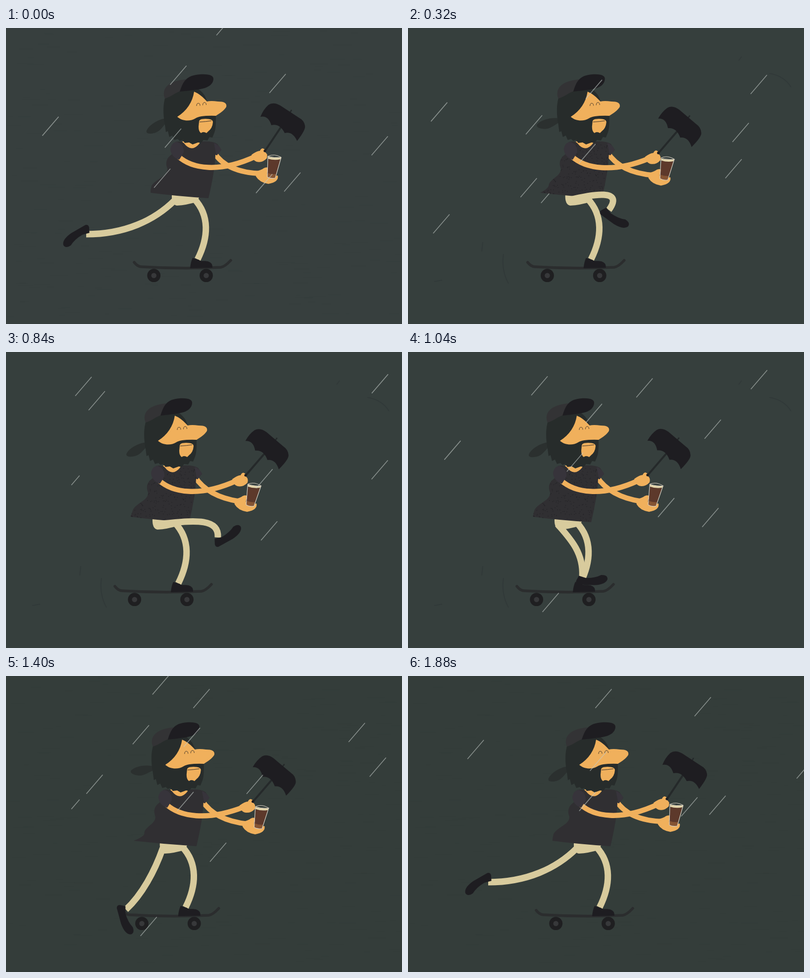
Animation, 800 px wide and 600 px high, one loop 1920 ms. Source, as an HTML page with a canvas:

```html
<!DOCTYPE html>
<html lang="en">
<meta charset="utf-8">
<title>Skating in the rain</title>
<style>
html, body { margin: 0; width: 100%; height: 100%; overflow: hidden; background: #373f3e; }
canvas { display: block; }
</style>
<canvas id="stage" width="800" height="600"></canvas>
<script>
const g = document.getElementById('stage').getContext('2d');
const LOOP = 1920, STEP = 40, STEPS = LOOP / STEP;
const SKIN = '#f0b05c', BLACK = '#1e1d21', HAIR = '#272c2b', SHIRT = '#302f32', PANTS = '#d8cb9d';

// Kicking leg: two curve controls, the ankle and the shoe angle
const back = { at: 0, pose: [300, 390, 240, 418, 162, 418, 150] };
const kicks = [
  back,
  { at: 320, pose: [390, 337, 455, 325, 423, 369, 36] },
  { at: 840, pose: [400, 345, 470, 330, 467, 376, -29] },
  { at: 1200, pose: [341, 400, 339, 460, 337, 511, 24] },
  { at: 1660, pose: back.pose },
  { at: LOOP, pose: back.pose }
];

function ease(t, from, to) {
  const s = Math.min(1, Math.max(0, (t - from) / (to - from)));
  return s * s * (3 - 2 * s);
}

function random(seed) {
  seed *= 7919;
  return () => (seed = seed * 16807 % 2147483647) / 2147483647;
}

// Each drop slides down one of the slanted lanes and ends at its landing step
const drops = (() => {
  const rnd = random(23), lanes = [];
  for (let i = 0; i < 19; i++) lanes.push({ top: 220 + i * 54, end: 190 + rnd() * 380 });
  return Array.from({ length: 76 }, (_, i) => ({ ...lanes[i % 19], land: Math.floor(rnd() * STEPS) }));
})();

function fill(d, color) {
  g.fillStyle = color;
  g.fill(new Path2D(d));
}

function line(d, color, width, cap = 'butt') {
  g.strokeStyle = color;
  g.lineWidth = width;
  g.lineCap = cap;
  g.stroke(new Path2D(d));
}

function disc(x, y, r, color) {
  g.fillStyle = color;
  g.beginPath();
  g.arc(x, y, r, 0, 7);
  g.fill();
}

function turned(x, y, degrees, draw) {
  g.save();
  g.translate(x, y);
  g.rotate(degrees * Math.PI / 180);
  g.translate(-x, -y);
  draw();
  g.restore();
}

function paper(kind) {
  g.fillStyle = ['#373f3e', '#363f3d', '#343d3a'][kind];
  g.fillRect(0, 0, 800, 600);
  if (kind === 1) {
    line('M193,458Q188,490 203,518M730,92Q760,97 774,120M668,66L674,58M53,514L69,511M151,434L149,453', 'rgba(30,38,40,.2)', 2);
    return;
  }
  const rnd = random(kind + 7);
  g.fillStyle = 'rgba(25,35,32,.06)';
  for (let i = 0; i < 260; i++) g.fillRect(rnd() * 800, rnd() * 585, 8 + rnd() * 30, 1);
}

function board() {
  line('M259,475Q266,484 274,484Q355,489 434,485Q442,484 454,471', '#2b2d2e', 5.5, 'round');
  for (const x of [298.7, 404.5]) {
    disc(x, 501.7, 13.4, '#1f1f21');
    disc(x, 501.7, 5.3, '#37383a');
  }
}

function shirt(hem, kind) {
  const d = `M342,231Q354,228 359,233Q375,254 391,234L396,230Q418,229 427,235L435,247L426,258L423,257
    Q422,290 409,345Q345,341 ${292 + hem},334Q${292 - hem},326 ${294 - hem},320
    C302,306 327,301 326,285C321,272 325,263 335,256Z`;
  fill(d, SHIRT);
  fill('M420,233Q430,236 435,247L426,258L424,254Z', '#37343b');
  if (kind !== 1) return;
  g.save();
  g.clip(new Path2D(d));
  const rnd = random(42);
  g.fillStyle = 'rgba(28,28,32,.5)';
  for (let i = 0; i < 330; i++) g.fillRect(285 + rnd() * 140, 235 + rnd() * 110, 1.6, 1.4);
  g.restore();
}

function head(tail, brim) {
  turned(322, 184, tail, () =>
    fill('M326,183C311,183 290,195 284,208C281,217 300,215 308,209C316,203 320,195 326,190Z', '#2b302f'));
  fill(`M322,139C317,155 317,175 321,196L323,211L327,209L330,221L336,218L340,227L347,225L351,229L357,227L361,233
    L370,232L377,236L388,232L394,233L399,227L407,228L411,221L417,222L421,212C424,205 424,190 424,176
    L400,150L406,148C403,137 396,128 386,122L350,122Z`, HAIR);
  fill(`M380,129C377,150 365,168 346,180C356,189 372,190 383,183Q392,177 424,178
    C432,173 441,167 445,160C447,152 440,149 428,149Q414,147 406,149C398,140 390,133 380,129Z`, SKIN);
  fill(`M390,190Q390,184 403,184Q418,184 418,191Q417,203 409,209L405,213Q402,211 399,211Q396,211 394,213
    Q389,210 389,200Z`, SKIN);
  line('M391,190.5Q404,190 415,188', '#3a2f28', 1);
  line('M385,158q0,-5.5 3.5,-5.5q3.5,0 3.5,5M397.5,156.5q0,-5.5 3.5,-5.5q3.5,0 3.5,5', '#4a3b2c', 1);
  fill('M321,143C313,123 328,106 366,104L353,128C343,130 335,139 321,143Z', '#333335');
  g.save();
  g.translate(352, 0);
  g.scale(brim, 1);
  g.translate(-352, 0);
  fill('M351,129C358,108 364,96 392,94C412,93 420,97 419,104C418,116 405,123 385,125C370,127 360,128 351,129Z', BLACK);
  g.restore();
}

function kickingLeg(t) {
  const i = kicks.findIndex(k => k.at > t), a = kicks[i - 1], b = kicks[i];
  const s = ease(t, a.at, b.at);
  const [x1, y1, x2, y2, x, y, angle] = a.pose.map((v, k) => v + (b.pose[k] - v) * s);
  line(`M341,349C${x1},${y1} ${x2},${y2} ${x},${y}`, PANTS, 13);
  g.save();
  g.translate(x, y);
  g.rotate(angle * Math.PI / 180);
  fill('M-7,-1L7,3Q25,3 38,-4Q51,-5 51,4Q48,15 25,17L-8,17Q-14,15 -12,9Z', BLACK);
  g.restore();
}

function lowerHand(sink) {
  g.save();
  g.translate(-sink / 2, sink);
  fill('M503,291Q516,288 521,284Q528,280 533,286L528,292Q526,299 533,302L549,299Q552,312 530,316Q512,313 505,301Z', SKIN);
  turned(536, 304, sink * .4, () => {
    fill('M530,265Q543,269 554,266L544,304Q535,306 528,302Z', '#5d392b');
    fill('M528.5,294Q536,297 546,296L544,304Q535,306 528,302Z', '#855433');
    fill('M529.5,261Q542,264 555.5,262L554.5,266Q542,269 529.5,265Z', '#e3d5ab');
    line('M529,260L528,302Q535,306 544,304L556,262', '#d6cfc2', 1.2);
    line('M529,260Q542,254 556,262Q542,264 529,260', '#d6cfc2', 1);
  });
  g.restore();
}

function upperHand(dy, angle) {
  g.save();
  g.translate(0, dy);
  turned(523, 250, angle, () => {
    line('M522,251L556,200', '#25292a', 4);
    line('M566,184L577,166', '#25292a', 2.6);
    fill(`M514,180Q530,177 536,197Q553,193 563,213Q579,209 588,229Q606,206 604,198
      Q602,187 592,182L554,157Q540,149 530,156Q520,165 514,180Z`, BLACK);
  });
  fill('M496,257Q507,249 513,249Q515,244 519,244Q525,246 521,250Q530,254 527,264Q518,274 506,271Q498,268 496,257Z', SKIN);
  disc(523, 249, 2.6, BLACK);
  g.restore();
}

function rain(n) {
  let d = '';
  for (const { top, end, land } of drops) {
    const left = (land - n + STEPS) % STEPS, y = end - 50.2 * left;
    const part = left ? 1 : .5;
    if (y > -40) d += `M${top - y * .932},${y}l${-33 * part},${38.5 * part}`;
  }
  line(d, 'rgba(195,202,198,.58)', 1.6);
}

function draw(now) {
  const n = Math.floor(now % LOOP / STEP), t = n * STEP, kind = (n >> 1) % 3;
  const lean = ease(t, 110, 565) - ease(t, 1170, 1720);
  const tilt = ease(t, 0, 320) - ease(t, 1500, 1880);
  const sway = Math.sin(t / LOOP * 2 * Math.PI) ** 2;
  const sink = 8 * lean, lift = 5.5 * sway;
  paper(kind);
  g.save();
  g.translate(-39 * lean, 0);
  board();
  line('M380,346C412,380 409,425 387,469', PANTS, 13);
  fill('M377,466L390,470C394,474 400,471 408,473Q418,476 417,486L372,487Q373,474 377,466Z', BLACK);
  fill('M335,338L390,343L387,352Q365,359 345,360Q334,358 335,338Z', PANTS);
  line(`M420,252Q446,293 ${515 - sink / 2},${295 + sink}`, SKIN, 10.5);
  fill('M356,230L392,230Q389,246 374,246Q362,245 356,230Z', SKIN);
  shirt(-10 * sway, kind);
  head(24 * sway, 1 - .06 * tilt);
  kickingLeg(t);
  lowerHand(sink);
  line(`M348,260C375,285 430,295 505,${260 + lift}`, SKIN, 10.5);
  upperHand(lift, 7 * tilt);
  fill('M345,231Q360,235 359,252Q354,261 350,267Q334,262 332,246Q334,232 345,231Z', '#37343b');
  g.restore();
  rain(n);
  requestAnimationFrame(draw);
}
draw(0);
</script>
</html>
```
